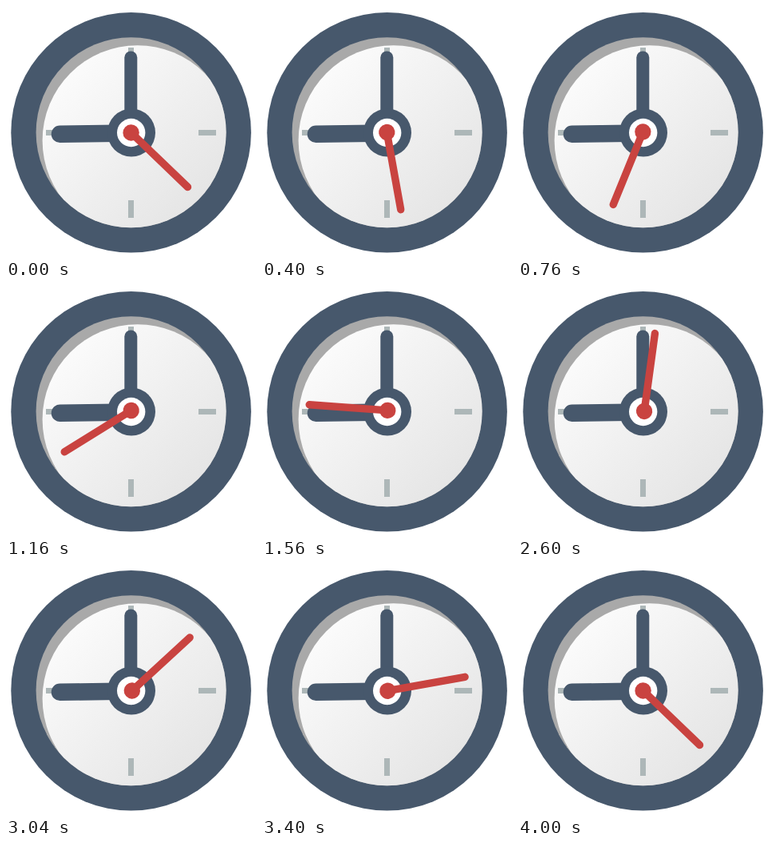
An HTML page that plays this animation: 313 px wide and 314 px high, repeating every 4.04 s.

```html
<!DOCTYPE html>
<html lang="en">
<head>
<meta charset="utf-8">
<title>Clock</title>
<style>
html, body { margin: 0; width: 100%; height: 100%; overflow: hidden; background: #fff; }
svg { display: block; }
</style>
</head>
<body>
<svg width="313" height="314" viewBox="0 0 313 314">
  <defs>
    <linearGradient id="shade" x1=".14" y1=".14" x2=".86" y2=".86">
      <stop offset="0" stop-color="#fbfbfb"/>
      <stop offset="1" stop-color="#e4e4e4"/>
    </linearGradient>
    <clipPath id="dial"><circle cx="156.6" cy="158.3" r="119"/></clipPath>
  </defs>

  <circle cx="156.6" cy="158.3" r="150.3" fill="#47586c"/>
  <g clip-path="url(#dial)">
    <rect width="313" height="314" fill="#a9a9a9"/>
    <circle cx="164.6" cy="168.3" r="119" fill="url(#shade)"/>
  </g>
  <path d="M156.5 52v22M156.5 243v22M50 158.5h22M241 158.5h22" stroke="#adb7b8" stroke-width="7"/>

  <g stroke="#47586c" stroke-linecap="round">
    <path d="M67.5 160.3L157 159" stroke-width="21.5"/>
    <path d="M156.3 64.5V158" stroke-width="16"/>
  </g>
  <circle cx="157" cy="158.5" r="30" fill="#47586c"/>
  <circle cx="156.7" cy="158.5" r="17.7" fill="#fff"/>

  <g id="second" fill="#c94340">
    <path d="M0 .9H98.3" stroke="#c94340" stroke-width="9.4" stroke-linecap="round"/>
    <circle cy=".9" r="10.2"/>
  </g>
</svg>
<script>
const LOOP = 4040, STEP = 40;
const second = document.getElementById('second');

function draw(now) {
  // One turn takes 100 steps; the last step rests on the starting pose.
  const step = Math.floor(now % LOOP / STEP);
  second.setAttribute('transform', `translate(157.2 157.8) rotate(${43.8 + step * 3.6})`);
  requestAnimationFrame(draw);
}
draw(0);
</script>
</body>
</html>
```
